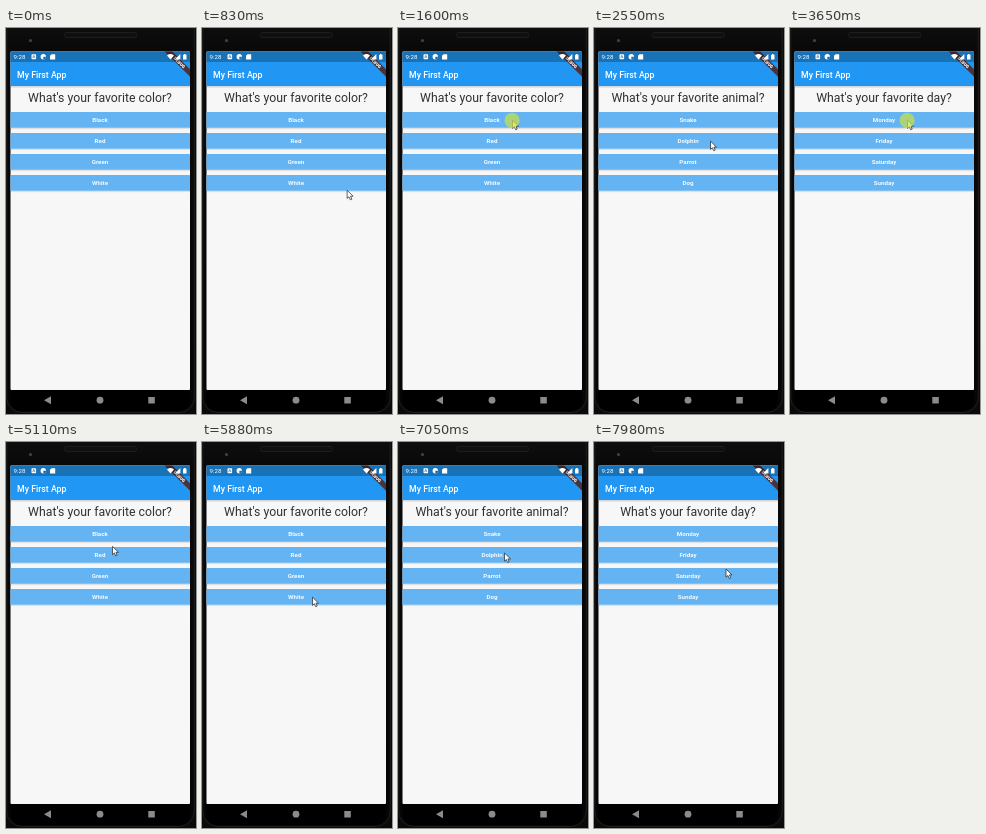
Write an HTML page that moves like this. It is 190 px wide and 386 px high and loops after 8000 ms.

```html
<!DOCTYPE html>
<html lang="en">
<head>
<meta charset="utf-8">
<title>Quiz app</title>
<style>
  html, body { margin: 0; width: 100%; height: 100%; overflow: hidden; background: #000; }
  svg { display: block; width: 100%; height: 100%; }
  text { font-family: Roboto, "Noto Sans", sans-serif; }
  .mid { text-anchor: middle; }
  .label { font-size: 6.2px; font-weight: 700; fill: #f4faff; }
</style>
</head>
<body>
<svg viewBox="0 0 190 386">
  <defs>
    <clipPath id="screen"><rect x="4.5" y="23.5" width="179.5" height="338.5" rx="1"/></clipPath>
    <linearGradient id="shade" x2="0" y2="1">
      <stop stop-color="#000" stop-opacity=".17"/>
      <stop offset="1" stop-color="#000" stop-opacity="0"/>
    </linearGradient>
    <linearGradient id="body" x2="0" y2="1">
      <stop stop-color="#131313"/>
      <stop offset=".1" stop-color="#090909"/>
      <stop offset="1" stop-color="#050505"/>
    </linearGradient>
  </defs>

  <!-- phone body -->
  <rect width="190" height="386" fill="#0a0a0a"/>
  <rect x=".8" y="-20" width="187.4" height="404.5" rx="15" fill="url(#body)" stroke="#262626" stroke-width=".8"/>
  <path d="M4.5 361H184v10q0 12-12 12H16.5q-12 0-12-12z"/>
  <rect x="58.5" y="4.5" width="72" height="5" rx="2" fill="#0f0f10" stroke="#242526" stroke-width=".7"/>
  <circle cx="24.5" cy="12.5" r="3" fill="#0b0d0f"/>
  <circle cx="24.5" cy="12.5" r="1.5" fill="#3c4847"/>

  <g clip-path="url(#screen)">
    <rect x="4" y="23" width="180" height="339" fill="#f7f7f7"/>
    <rect x="4" y="58" width="180" height="2.5" fill="url(#shade)"/>
    <rect x="4" y="23" width="180" height="35" fill="#2196f3"/>
    <g transform="translate(184 24) rotate(45)">
      <rect x="-20" y="12.25" width="40" height="5.3" fill="#46343f"/>
      <text class="mid" y="16.5" font-size="4.5" font-weight="900" fill="#fff">DEBUG</text>
    </g>
    <rect x="4" y="23" width="180" height="11" opacity=".25"/>
    <g fill="#fff">
      <text x="7.5" y="31.2" font-size="6.2">9:28</text>
      <rect x="25.5" y="26.3" width="4.6" height="5" rx=".8"/>
      <path d="M26.7 30l1.1-2.6L29 30" fill="none" stroke="#166fb3" stroke-width=".7"/>
      <circle cx="37.3" cy="28.8" r="2.7"/>
      <path d="M37.3 28.8h2.7a2.7 2.7 0 0 1-2.7 2.7z" fill="#166fb3"/>
      <path d="M45.5 26.2h3.7v5.2h-5.2v-3.6z"/>
      <path d="M161 27.4q3.5-2.8 7 0l-3.5 4.1z"/>
      <path d="M174.4 26v5.5h-5.5z"/>
      <path d="M177 26.7h1v-.7h1.5v.7h1v4.8H177z"/>
    </g>
    <text x="11.1" y="49.5" font-size="8.76" font-weight="500" fill="#fff">My First App</text>

    <g id="quiz">
      <text id="question" class="mid" x="94" y="74.1" font-size="12.27" fill="#303030"></text>
      <g id="buttons"></g>
    </g>

    <g id="result">
      <text class="mid" x="94" y="73" font-size="15.77" font-weight="700" fill="#262626">You are ... very strange</text>
      <g transform="translate(94 85.8)">
        <circle r="8.6" fill="#f8cd3c"/>
        <g fill="#fff"><circle cx="-3.3" cy="-1.8" r="2.1"/><circle cx="3.3" cy="-1.8" r="2.1"/></g>
        <g fill="#5b422a">
          <circle cx="-3.3" cy="-1.8" r="1"/><circle cx="3.3" cy="-1.8" r="1"/>
          <ellipse cy="4.2" rx="2.7" ry="2.4"/>
        </g>
        <path d="M-5.5-5.1q1.7-1.5 3.2-.9M5.5-5.1q-1.7-1.5-3.2-.9" fill="none" stroke="#8b6428" stroke-width=".7"/>
      </g>
      <text class="mid" x="94" y="107.4" font-size="6.2" font-weight="500" fill="#6fb0e6">Restart Quiz</text>
    </g>
  </g>

  <!-- navigation bar -->
  <g fill="#8b8b8b">
    <path d="M38 372.2l7-4v8z"/>
    <circle cx="94" cy="372.2" r="3.4"/>
    <rect x="142.3" y="369" width="6.5" height="6.5"/>
  </g>

  <g id="pointer">
    <path d="M0 0v8.2l1.9-1.7 1.3 3 1.5-.6-1.3-3h2.6z" fill="#fff" stroke="#222" stroke-width=".7" stroke-linejoin="round"/>
    <circle id="press" cx="-.4" cy=".2" r="7.6" fill="#ccdf45" opacity=".7"/>
  </g>
</svg>
<script>
const LOOP = 8000, ENTER = 290, HOLD = 150;
const get = id => document.getElementById(id);
const rowY = row => 92.2 + 21 * row;

const screens = {
  color: ["What's your favorite color?", "Black", "Red", "Green", "White"],
  animal: ["What's your favorite animal?", "Snake", "Dolphin", "Parrot", "Dog"],
  day: ["What's your favorite day?", "Monday", "Friday", "Saturday", "Sunday"],
  result: null
};

// The pointer glides to each stop; a tap opens the next screen on release.
const stops = [
  { arrive: 1060, travel: 800, x: 134, y: rowY(1) },
  { arrive: 1450, travel: 350, x: 114.5, y: rowY(0), tap: 1600, next: "animal" },
  { arrive: 2550, travel: 500, x: 116.5, y: rowY(1), tap: 2700, next: "day" },
  { arrive: 3250, travel: 350, x: 117.5, y: rowY(0), tap: 3570, next: "result" },
  { arrive: 4660, travel: 340, x: 106.5, y: 104.4, tap: 4960, next: "color" },
  { arrive: 5850, travel: 400, x: 110.5, y: rowY(3) },
  { arrive: 6500, travel: 600, x: 104.5, y: rowY(2), tap: 6670, next: "animal" },
  { arrive: 7050, travel: 220, x: 106.5, y: 111, tap: 7450, next: "day" },
  { arrive: 7980, travel: 380, x: 132, y: 127 }
];
const taps = stops.filter(stop => stop.tap);

get("buttons").innerHTML = screens.color.slice(1).map((_, row) => {
  const y = rowY(row) - 8.2;
  return `<rect x="4" y="${y + 15.5}" width="180" height="2.2" fill="url(#shade)"/>
    <rect x="4" y="${y}" width="180" height="15.8" rx=".9" fill="#64b4f4"/>
    <text class="mid label" x="94" y="${y + 10.1}"></text>`;
}).join("");
const labels = document.querySelectorAll(".label");

function ease(p) {
  const c = Math.min(1, Math.max(0, p));
  return c * c * (3 - 2 * c);
}

function pointerAt(t) {
  let x = 190, y = 360;
  for (const stop of stops) {
    const done = ease(1 - (stop.arrive - t) / stop.travel);
    x += (stop.x - x) * done;
    y += (stop.y - y) * done;
  }
  return [x, y];
}

let shown;
function showScreen(name) {
  if (name === shown) return;
  shown = name;
  const page = screens[name];
  get("quiz").style.display = page ? "" : "none";
  get("result").style.display = page ? "none" : "";
  if (!page) return;
  get("question").textContent = page[0];
  labels.forEach((label, i) => { label.textContent = page[i + 1]; });
}

function draw(t) {
  const last = taps.filter(({ tap }) => tap + HOLD <= t).pop();
  showScreen(last ? last.next : "color");
  const pressed = taps.some(({ tap }) => t >= tap && t < tap + HOLD);
  get("press").style.display = pressed ? "" : "none";
  get("pointer").style.display = t < ENTER ? "none" : "";
  get("pointer").setAttribute("transform", `translate(${pointerAt(t)})`);
}

const begin = performance.now();
function tick() {
  draw((performance.now() - begin) % LOOP);
  requestAnimationFrame(tick);
}
tick();
</script>
</body>
</html>
```
